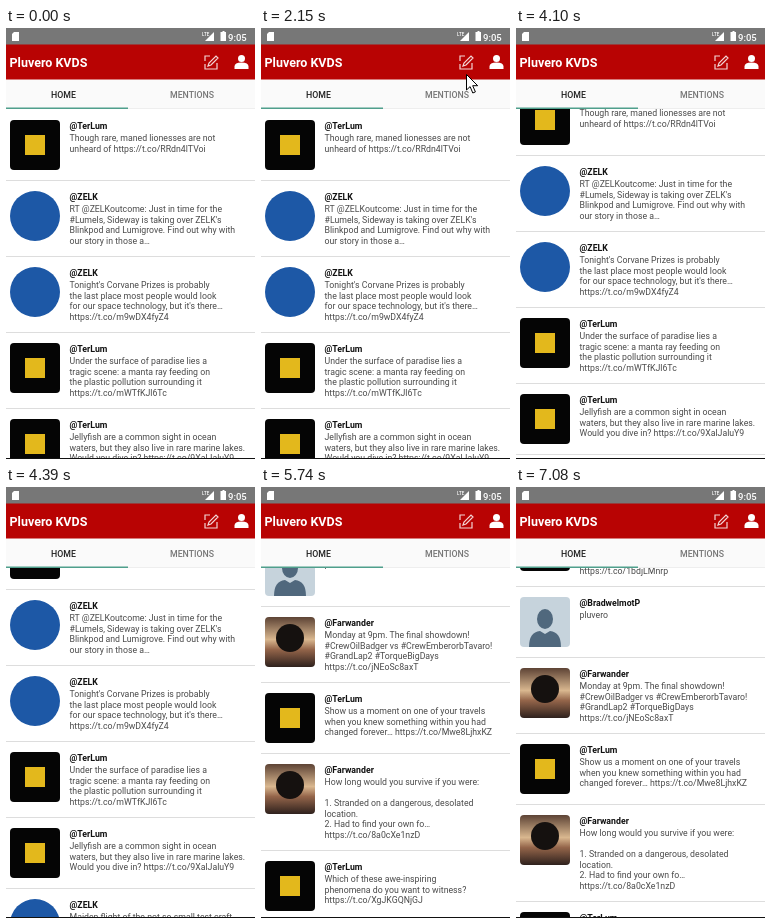
Write an HTML page that moves like this. It is 249 by 431 pixels and loops after 8000 ms.

```html
<!DOCTYPE html>
<html lang="en">
<head>
<meta charset="utf-8">
<title>Timeline</title>
<style>
html, body { margin: 0; width: 100%; height: 100%; overflow: hidden; background: #fff; }
#stage { position: relative; width: 249px; height: 431px; overflow: hidden; background: #fff;
  font: 8.75px/10.5px Roboto, Arial, sans-serif; color: #4a4a4a; }
#stage > * { position: absolute; }
#top { left: 0; top: 0; }
#top text { font-weight: 500; }
#view { left: 0; top: 81px; width: 249px; height: 349px; overflow: hidden; }
#list { padding-top: 1px; }
.row { display: flex; box-sizing: border-box; padding: 10px 0 10px 4px; border-bottom: 1px solid #ddd; white-space: pre; }
.row svg { flex: none; width: 50px; height: 50px; margin-right: 9.5px; }
.row b { display: block; line-height: 13px; color: #111; }
#edge { left: 0; top: 429.5px; width: 249px; height: 2px; background: #111; }
#cursor { left: 0; top: 0; overflow: visible; }
</style>
</head>
<body>
<div id="stage">
  <div id="view"><div id="list"></div></div>
  <svg id="top" width="249" height="81">
    <rect width="249" height="81" fill="#fafafa"/>
    <rect width="249" height="17" fill="#777"/>
    <rect y="16.5" width="249" height="35" fill="#b80303"/>
    <g fill="#fff">
      <path d="M8 4h5v9H6V6z"/>
      <text x="196" y="8" font-size="4.5">LTE</text>
      <path d="M208 4v9h-9z"/>
      <path d="M214.500 4h2v-1h2v1h1.500v9h-5.500z"/>
      <text x="222" y="12.500" font-size="9.500">9:05</text>
      <text x="3.500" y="38.500" font-size="12.500" style="font-weight:700">Pluvero KVDS</text>
      <circle cx="235.500" cy="30.500" r="3.500"/>
      <path d="M228.500 41v-2.500q0-4 7-4t7 4V41z"/>
    </g>
    <g fill="none" stroke="#f3d5d5" stroke-width="1.200">
      <path d="M204 28h-5v5M199 36v5h12v-6M202 38l1-3 7-7 2 2-7 7z"/>
    </g>
    <text x="57.500" y="70" font-size="8.750" text-anchor="middle" fill="#222">HOME</text>
    <text x="186" y="70" font-size="8.750" text-anchor="middle" fill="#777">MENTIONS</text>
    <rect y="80" width="249" height="1" fill="#eee"/>
    <rect y="79.500" width="122" height="1.500" fill="#4f9f8c"/>
  </svg>
  <div id="edge"></div>
  <svg id="cursor" width="13" height="20">
    <path d="M.5.5v15.500l3.600-3.400 2.700 6.400 2.600-1.100-2.700-6.200h5z" fill="#fff" stroke="#000"/>
  </svg>
</div>
<svg width="0" height="0" style="position:absolute">
  <linearGradient id="dusk" x2="0" y2="1">
    <stop offset="0" stop-color="#5d4335"/>
    <stop offset=".45" stop-color="#d9b78f"/>
    <stop offset=".65" stop-color="#94654a"/>
    <stop offset="1" stop-color="#2e211d"/>
  </linearGradient>
</svg>
<script>
const tile = fill => `<rect width="50" height="50" rx="4" fill="${fill}"/>`;
const avatars = {
  TerLum: tile('#050505') + '<rect x="15" y="15" width="20" height="20" fill="#e3b81c"/>',
  ZELK: '<circle cx="25" cy="25" r="25" fill="#1d58a6"/>',
  Farwander: tile('url(#dusk)') + '<circle cx="25" cy="21" r="14" fill="#15110f"/>',
  BradwelmotP: tile('#c6d3dc') +
    '<ellipse cx="25" cy="22" rx="8" ry="10" fill="#50687d"/><path d="M9 50q0-15 11-16l5 3 5-3q11 1 11 16z" fill="#50687d"/>'
};

const posts = [
  ['TerLum', 'Though rare, maned lionesses are not\nunheard of https://t.co/RRdn4lTVoi'],
  ['ZELK', 'RT @ZELKoutcome: Just in time for the\n#Lumels, Sideway is taking over ZELK\'s\nBlinkpod and Lumigrove. Find out why with\nour story in those a…'],
  ['ZELK', 'Tonight\'s Corvane Prizes is probably\nthe last place most people would look\nfor our space technology, but it\'s there…\nhttps://t.co/m9wDX4fyZ4'],
  ['TerLum', 'Under the surface of paradise lies a\ntragic scene: a manta ray feeding on\nthe plastic pollution surrounding it\nhttps://t.co/mWTfKJl6Tc'],
  ['TerLum', 'Jellyfish are a common sight in ocean\nwaters, but they also live in rare marine lakes.\nWould you dive in? https://t.co/9XalJaluY9'],
  ['ZELK', 'Maiden flight of the not so small test craft\nis ready to go. Follow along as the crew\nprepares for the first launch\nhttps://t.co/4kQvTz8wLe'],
  ['TerLum', 'A quiet morning on the ice, and the\nfirst light of spring brings the seals\nback to the shore\nhttps://t.co/1bdjLMnrp'],
  ['BradwelmotP', 'pluvero'],
  ['Farwander', 'Monday at 9pm. The final showdown!\n#CrewOilBadger vs #CrewEmberorbTavaro!\n#GrandLap2 #TorqueBigDays\nhttps://t.co/jNEoSc8axT'],
  ['TerLum', 'Show us a moment on one of your travels\nwhen you knew something within you had\nchanged forever… https://t.co/Mwe8LjhxKZ'],
  ['Farwander', 'How long would you survive if you were:\n\n1. Stranded on a dangerous, desolated\nlocation.\n2. Had to find your own fo…\nhttps://t.co/8a0cXe1nzD'],
  ['TerLum', 'Which of these awe-inspiring\nphenomena do you want to witness?\nhttps://t.co/XgJKGQNjGJ']
];

const list = document.getElementById('list');
const cursor = document.getElementById('cursor');
list.innerHTML = posts.map(([name, text]) =>
  `<div class="row"><svg viewBox="0 0 50 50">${avatars[name]}</svg><div><b>@${name}</b>${text}</div></div>`).join('');

const LOOP = 8000, TICK = 149.6, START = 492;
const FLING_END = 515;

// Cursor path: [tick, x, y]
const path = [[0, 160, 332], [3, 166, 209], [6, 147, 84], [9, 202, 54], [10, 202, 54],
  [11, 205, 46], [12, 203, 39], [13, 193, 48], [16, 95, 121]];
// Later drags: [tick, distance from the end of the fling]
const drags = [[34, 20], [35, 40], [39, 30], [40, 8], [44, -11]];

function pointAt(k) {
  const i = Math.max(1, path.findIndex(p => p[0] >= k));
  const [k0, x0, y0] = path[i - 1], [k1, x1, y1] = path[i];
  const u = (k - k0) / (k1 - k0);
  return [x0 + (x1 - x0) * u, y0 + (y1 - y0) * u];
}

function scrollAt(k) {
  if (k < 18) return 0;
  if (k <= 26) return 50 * ((k - 17) / 9) ** 2.76;
  if (k <= 30) return 50 + (FLING_END - 50) * (1 - ((30 - k) / 4) ** 2);
  return FLING_END + drags.reduce((d, [at, to]) => k >= at ? to : d, 0);
}

function draw() {
  const k = Math.floor((performance.now() % LOOP - START) / TICK);
  list.style.transform = `translateY(${-Math.round(scrollAt(k))}px)`;
  const shown = k >= 0 && k <= 16;
  cursor.style.display = shown ? 'block' : 'none';
  if (shown) {
    const [x, y] = pointAt(k).map(Math.round);
    cursor.style.transform = `translate(${x}px, ${y}px)`;
  }
  requestAnimationFrame(draw);
}
draw();
</script>
</body>
</html>
```
